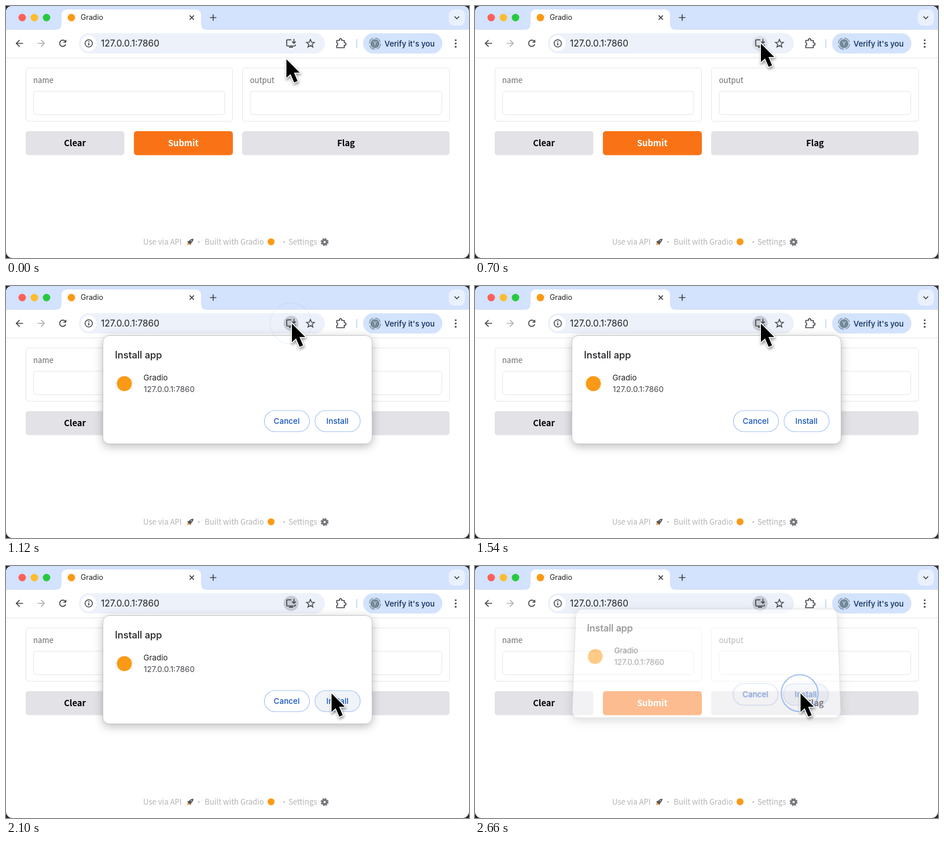
Animation, 800 px wide and 435 px high, one loop 2.73 s. Source, as an HTML page:

```html
<!DOCTYPE html>
<html lang="en">
<head>
<meta charset="utf-8">
<title>Install app</title>
<style>
  html, body { margin: 0; width: 100%; height: 100%; overflow: hidden; background: #2a2725; }
  svg { position: absolute; left: 0; top: 0; overflow: visible; }
  text { font-family: Inter, sans-serif; fill: #1f2023; }
  .page text { font-family: "Noto Sans CJK SC", "Noto Sans CJK JP", "Noto Sans", sans-serif; }
  .page .label { font-size: 13.2px; fill: #6b6b70; }
  .page .foot { font-size: 13.1px; fill: #b3b3b8; }
  .page .dot { text-anchor: middle; }
  .page .btn { font-size: 14.7px; font-weight: 700; text-anchor: middle; fill: #000; }
  .line { fill: none; stroke: #45474b; stroke-width: 1.7; }
  .box { fill: #fff; stroke: #e4e4e7; }
  .med { font-weight: 500; }
  #dialog { left: 167px; top: 85px; transform-origin: 50% 100%; filter: drop-shadow(0 4px 8px #0004); }
  #dialog .act { font-size: 13.5px; fill: #1554c0; text-anchor: middle; }
  #dialog .pill { fill: #fff; stroke: #a8c3f5; stroke-width: 1.2; }
  #cursor { filter: drop-shadow(1px 3px 2px #0006); }
</style>
</head>
<body>
<svg width="800" height="435">
  <rect width="800" height="435" rx="11" fill="#fff"/>
  <path d="M0 41V11Q0 0 11 0H789Q800 0 800 11V41Z" fill="#d3e2fd"/>

  <!-- tab strip -->
  <path d="M86 41Q96 41 96 31V16Q96 6 106 6H327Q337 6 337 16V31Q337 41 347 41Z" fill="#fff"/>
  <circle cx="28" cy="20" r="6.5" fill="#fe5f57"/>
  <circle cx="49" cy="20" r="6.5" fill="#febc2e"/>
  <circle cx="70" cy="20" r="6.5" fill="#28c840"/>
  <circle cx="113" cy="20" r="6.5" fill="#fb9a16"/>
  <text x="129" y="24.3" font-size="12.4">Gradio</text>
  <path class="line" d="M317.3 16.3l7.4 7.4m0-7.4l-7.4 7.4M352.5 20h11M358 14.5v11"/>
  <rect x="765" y="6" width="28" height="28" rx="9" fill="#eaf1fe"/>
  <path class="line" d="M775 18l4 4 4-4"/>

  <!-- toolbar -->
  <path d="M0 89.5H800" stroke="#e3e5e8"/>
  <rect x="126" y="47" width="425" height="35" rx="17.5" fill="#ecf1fa"/>
  <rect x="617" y="47" width="137" height="35" rx="17.5" fill="#d3e3fd"/>
  <g class="line">
    <path d="M29.5 64.5H18m5.5-5.7L17.8 64.5l5.7 5.7"/>
    <path d="M54.5 64.5H66m-5.5-5.7l5.7 5.7-5.7 5.7" stroke="#b0b2b6"/>
    <path d="M102.5 61.2A5.4 5.4 0 1 0 103.2 66M103.4 58.5V62.5H99.2"/>
  </g>
  <circle cx="143" cy="64.5" r="13.5" fill="#fff"/>
  <circle class="line" cx="143" cy="64.5" r="6.3" style="stroke-width:1.5"/>
  <path d="M143 63.7v4.3M143 60.7v1.7" stroke="#333" stroke-width="1.6"/>
  <text x="164" y="70" font-size="15.5">127.0.0.1:7860</text>
  <circle id="hover" cx="492.5" cy="64.5" r="13" fill="#50555f"/>
  <g class="line">
    <path d="M493 58.3H486.3Q485 58.3 485 59.6V67.7Q485 69 486.3 69H498.7Q500 69 500 67.7V66.5M489 71.2H496M497.5 56.8V64M494.3 61.3L497.5 64.4 500.7 61.3"/>
    <path id="star" stroke-width="1.5"/>
    <path d="M571.5 59.5H576V58.5a2.1 2.1 0 0 1 4.2 0v1H584.5V63.5h.8a2.2 2.2 0 0 1 0 4.4h-.8V72H571.5V68a2.3 2.3 0 0 0 0-4.5Z"/>
    <path d="M606 57V73" stroke="#bcd2f8" style="stroke-width:1.5"/>
  </g>
  <circle cx="637.5" cy="65" r="7.8" fill="#74899a"/>
  <circle cx="637.5" cy="65" r="9.7" fill="none" stroke="#74899a" stroke-width="1.3" stroke-dasharray="12 3.23"/>
  <text x="637.5" y="68.3" font-size="9" text-anchor="middle" style="fill:#e8eef5">Y</text>
  <text class="med" x="654" y="69.8" font-size="13.2" style="fill:#0b2a5c">Verify it's you</text>
  <g fill="#45474b">
    <circle cx="777" cy="59" r="1.6"/><circle cx="777" cy="64.7" r="1.6"/><circle cx="777" cy="70.4" r="1.6"/>
  </g>

  <!-- page -->
  <g class="page">
    <rect class="box" x="34.5" y="107" width="357" height="92" rx="5"/>
    <rect class="box" x="47.5" y="147" width="330.5" height="40.5" rx="5"/>
    <rect class="box" x="408.5" y="107" width="358" height="92" rx="5"/>
    <rect class="box" x="422" y="147" width="331" height="40.5" rx="5"/>
    <text class="label" x="47" y="132.7">name</text>
    <text class="label" x="421.5" y="132.7">output</text>
    <rect x="34" y="216" width="170.5" height="41.5" rx="5" fill="#e3e2e7"/>
    <rect x="221" y="216" width="171" height="41.5" rx="5" fill="#f97316"/>
    <rect x="408" y="216" width="358.5" height="41.5" rx="5" fill="#e3e2e7"/>
    <text class="btn" x="119" y="242.3">Clear</text>
    <text class="btn" x="306.3" y="242.3" style="fill:#fff">Submit</text>
    <text class="btn" x="587.5" y="242.3">Flag</text>
    <text class="foot" x="237" y="412.3">Use via API</text>
    <text class="foot dot" x="333.3" y="412.3">·</text>
    <text class="foot" x="343.3" y="412.3">Built with Gradio</text>
    <text class="foot dot" x="480.7" y="412.3">·</text>
    <text class="foot" x="488" y="412.3">Settings</text>
  </g>
  <g transform="translate(319 406.5) rotate(45) scale(.85)">
    <path d="M-3.5 4L0 10 3.5 4Z" fill="#fb8c1e"/>
    <path d="M0-8Q4-4 3 1L5 5H-5L-3 1Q-4-4 0-8Z" fill="#55565c"/>
    <circle cy="-2" r="1.2" fill="#ddd"/>
  </g>
  <circle cx="458" cy="407" r="6" fill="#fb9a16"/>
  <circle cx="550.5" cy="407.5" r="3.7" fill="none" stroke="#737378" stroke-width="3.4"/>
  <circle cx="550.5" cy="407.5" r="5.9" fill="none" stroke="#737378" stroke-width="2" stroke-dasharray="2.6 2.034"/>
</svg>

<svg id="dialog" width="466" height="188">
  <rect x=".5" y=".5" width="465" height="187" rx="11" fill="#fff" stroke="#c4c5c8"/>
  <text class="med" x="21.3" y="39.6" font-size="16.6">Install app</text>
  <circle cx="37.5" cy="83.5" r="13" fill="#fb9a16"/>
  <text x="70.5" y="78.3" font-size="13.4">Gradio</text>
  <text x="71" y="98.3" font-size="13.5" style="fill:#44464a">127.0.0.1:7860</text>
  <rect class="pill" x="279.5" y="130" width="78" height="36.5" rx="18.25"/>
  <rect class="pill" id="install" x="367" y="130" width="78" height="36.5" rx="18.25"/>
  <text class="med act" x="318" y="153">Cancel</text>
  <text class="med act" x="405.7" y="153">Install</text>
</svg>

<svg width="800" height="435">
  <circle id="ring" fill="none" stroke="#7ba8f0" stroke-width="1.8"/>
  <path id="cursor" d="M0 0V32L7.1 25.4 13.4 40 19.3 37.4 13.1 23H23Z" stroke="#fff" stroke-width="3.2" stroke-linejoin="round" paint-order="stroke"/>
</svg>

<script>
const LOOP = 2730, STEP = 70;
const $ = id => document.getElementById(id);
const ramp = (t, a, b) => Math.min(1, Math.max(0, (t - a) / (b - a)));
const smooth = p => p * p * (3 - 2 * p);
const mix = (a, b, p) => a + (b - a) * p;

$("star").setAttribute("d", "M" + Array.from({ length: 10 }, (_, i) => {
  const r = i % 2 ? 3.2 : 7.2, a = i * Math.PI / 5;
  return [526 + r * Math.sin(a), 65 - r * Math.cos(a)].map(v => v.toFixed(1));
}).join("L") + "Z");

function cursorAt(t) {
  if (t < 1540) {
    const p = smooth(ramp(t, 180, 660));
    return [mix(484.5, 494, p), mix(92, 65, p)];
  }
  const p = smooth(ramp(t, 1540, 2100));
  return [mix(494, 562.5, p ** 1.25), mix(65, 220, p)];
}

function drawRing(t) {
  const second = t > 1540;
  const age = t - (second ? 2501 : 840);
  const p = ramp(age, 0, 300);
  const ring = $("ring");
  ring.setAttribute("cx", second ? 561 : 492);
  ring.setAttribute("cy", second ? 219.5 : 64.5);
  ring.setAttribute("r", 35.5 * (1 - (1 - p) ** 3));
  ring.style.opacity = age > 0 ? 1 - ramp(p, 0.4, 1) : 0;
}

function drawDialog(t) {
  const opened = 1 - (1 - ramp(t, 877, 1087)) ** 3;
  const shown = opened * (1 - ramp(t, 2590, 2736));
  const k = (1 - shown) / 0.48;
  const style = $("dialog").style;
  style.opacity = shown;
  style.transform = k
    ? `perspective(840px) translateY(${-10.5 * k}px) scaleY(${1 + 0.047 * k}) rotateX(${8 * k}deg)`
    : "none";
}

function frame(now) {
  const t = Math.floor(now % LOOP / STEP) * STEP;
  $("cursor").setAttribute("transform", `translate(${cursorAt(t)})`);
  $("hover").style.opacity = 0.1 * ramp(t, 600, 700) + 0.14 * ramp(t, 840, 980);
  $("install").style.fill = `rgb(${[236, 240, 245].map(v => mix(255, v, ramp(t, 1990, 2130)))})`;
  drawRing(t);
  drawDialog(t);
}

const start = performance.now();
function tick() {
  frame(performance.now() - start);
  requestAnimationFrame(tick);
}
tick();
</script>
</body>
</html>
```
